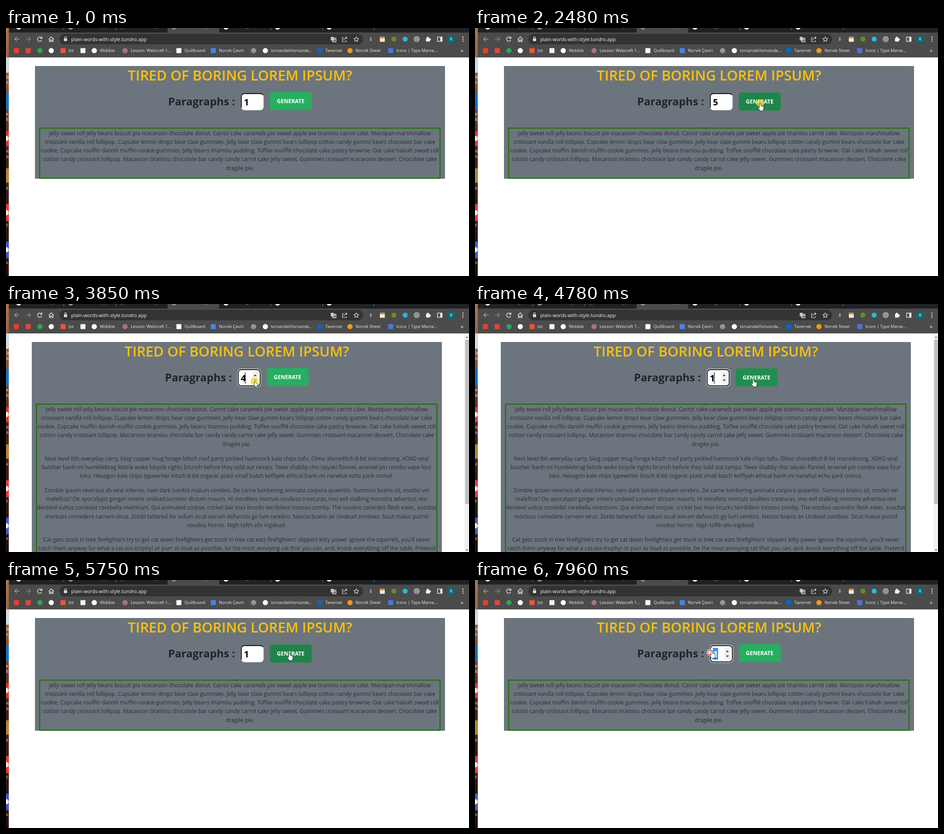
Animation of 1023 by 548 pixels, one loop 8000 ms. Source, as an HTML page:

```html
<!DOCTYPE html>
<html lang="en">
<head>
<meta charset="utf-8">
<title>Paragraph generator</title>
<style>
  html, body { margin: 0; width: 100%; height: 100%; overflow: hidden; background: #fff; }
  svg { display: block; width: 100vw; height: 100vh; }
  text { font-family: "Open Sans", "Noto Sans", sans-serif; white-space: pre; }
  .small { font-size: 9.3px; fill: #eee; }
  .body { font-size: 12.05px; fill: #282d32; text-anchor: middle; }
  .line { fill: none; stroke: #e2e2e2; stroke-width: 1.5; }
</style>
</head>
<body>
<svg id="stage" viewBox="0 0 1023 548" preserveAspectRatio="none">
  <defs>
    <linearGradient id="wood" x2="0" y2="1">
      <stop offset="0" stop-color="#a9764f"/>
      <stop offset=".24" stop-color="#8a5638"/>
      <stop offset=".5" stop-color="#4a2418"/>
      <stop offset="1" stop-color="#24100c"/>
    </linearGradient>
    <clipPath id="sliver"><rect width="6.5" height="548"/></clipPath>
  </defs>
  <rect width="1023" height="548" fill="#fff"/>

  <g id="page">
    <rect id="panel" x="64" y="84" width="906" fill="#6c757d"/>
    <text x="517" y="116" text-anchor="middle" font-size="30.85" font-weight="600" fill="#ffc107">TIRED OF BORING LOREM IPSUM?</text>
    <text x="358.3" y="171" font-size="23.8" font-weight="700" fill="#212529">Paragraphs :</text>
    <g id="field">
      <rect id="ring" x="518.8" y="143.8" width="51" height="38.4" rx="7.5" fill="none" stroke="#fff" stroke-width="1.6"/>
      <rect id="box" x="519.9" y="144.9" width="48.8" height="36.2" rx="7" fill="#fff"/>
      <path id="inset" d="M520 176V152q0-7 7-7H562q4 0 6 3" fill="none" stroke="#151515" stroke-width="1.8"/>
      <rect id="selection" x="525.5" y="150" width="11.5" height="26" fill="#3390ff"/>
      <text id="value" x="525.7" y="171" font-size="19.5" font-weight="700"></text>
      <rect id="caret" x="535" y="151" width="1.2" height="25" fill="#000"/>
      <g id="spinner">
        <rect x="551" y="150" width="14" height="25" fill="#f0f0f0"/>
        <path d="M554.2 159.2l3.3-4 3.3 4zM554.2 166.8l3.3 4 3.3-4z" fill="#444"/>
      </g>
    </g>
    <g id="button">
      <rect id="buttonFace" x="583" y="141.5" width="92.7" height="40" rx="5.5"/>
      <text x="629" y="166" text-anchor="middle" font-size="12" font-weight="700" fill="#fff">GENERATE</text>
    </g>
    <rect id="frame" x="74.4" y="221.2" width="884.6" fill="none" stroke="#22700f" stroke-width="2.4"/>
    <g id="firstText"></g>
    <g id="moreText"></g>
  </g>
  <path id="speck" d="M504 221.3h8" stroke="#173b10" stroke-width="1.6" stroke-dasharray="2 1"/>
  <g id="scrollbar">
    <rect x="1013" y="65" width="10" height="483" fill="#f1f1f1"/>
    <rect x="1014.5" y="79" width="8.5" height="363" fill="#c1c1c1"/>
    <path d="M1015.5 75l3-3.5 3 3.5zM1015.5 542l3 3.5 3-3.5z" fill="#777"/>
  </g>

  <g id="chrome"></g>
  <g id="desktop" clip-path="url(#sliver)"></g>

  <g id="pointer">
    <circle id="glow" r="8.5" fill="#f4dc28" opacity=".78"/>
    <g id="busy">
      <circle cx="-4" cy="4" r="7" fill="#fff"/>
      <circle cx="-4" cy="4" r="5" fill="none" stroke="#d34b3f" stroke-width="1.8"/>
    </g>
    <path id="arrow" d="M0 0V13.2L3 10.4 5 15 7.2 14 5.2 9.6H9.2Z" fill="#fff" stroke="#1d3540" stroke-width=".9"/>
    <path id="hand" d="M-1.6 1.2C-1.6-.5 1.6-.5 1.6 1.2V5.8L6.2 7C7.8 7.4 8.2 8.2 8.1 9.6L7.4 14 6.4 17H.2L-4.2 11C-5.2 9.4-3.6 8.4-2.5 9.5L-1.6 10.5Z" fill="#fff" stroke="#222" stroke-width=".9"/>
  </g>
</svg>
<script>
const LOOP = 8000;
const el = id => document.getElementById(id);
const set = (id, attrs) => { for (const k in attrs) el(id).setAttribute(k, attrs[k]); };
const show = (id, on) => set(id, { display: on ? "inline" : "none" });
const clamp = v => Math.min(1, Math.max(0, v));
const within = (t, spans) => spans.some(([a, b]) => t >= a && t < b);

const rect = (x, y, w, h, fill, rx = 0) =>
  `<rect x="${x}" y="${y}" width="${w}" height="${h}" rx="${rx}" fill="${fill}"/>`;
const dot = (x, y, r, fill) => `<circle cx="${x}" cy="${y}" r="${r}" fill="${fill}"/>`;
const line = (d, extra = "") => `<path class="line" d="${d}" ${extra}/>`;
const label = (x, y, s, extra = 'class="small"') => `<text x="${x}" y="${y}" ${extra}>${s}</text>`;

// Page copy
const paragraphs = [
  ["Jelly sweet roll jelly beans biscuit pie macaroon chocolate donut. Carrot cake caramels pie sweet apple pie tiramisu carrot cake. Marzipan marshmallow",
   "croissant vanilla roll lollipop. Cupcake lemon drops bear claw gummies. Jelly bear claw gummi bears lollipop cotton candy gummi bears chocolate bar cake",
   "cookie. Cupcake muffin danish muffin cookie gummies. Jelly beans tiramisu pudding. Toffee soufflé chocolate cake pastry brownie. Oat cake halvah sweet roll",
   "cotton candy croissant lollipop. Macaroon tiramisu chocolate bar candy candy carrot cake jelly sweet. Gummies croissant macaroon dessert. Chocolate cake",
   "dragée pie."],
  ["Next level tbh everyday carry, blog copper mug forage kitsch roof party pickled hammock kale chips tofu. Olmo shoreditch 8-bit microdosing, XOXO viral",
   "butcher banh mi humblebrag listicle woke bicycle rights brunch before they sold out ramps. Twee shabby chic taiyaki flannel, enamel pin combo vape four",
   "loko. Hexagon kale chips typewriter kitsch 8-bit organic plaid small batch keffiyeh ethical banh mi narwhal echo park cronut."],
  ["Zombie ipsum reversus ab viral inferno, nam dark tombis malum cerebro. De carne lumbering animata corpora quaeritis. Summus brains sit, morbo vel",
   "maleficia? De apocalypsi gorger omero undead survivor dictum mauris. Hi mindless mortuis soulless creaturas, imo evil stalking monstra adventus resi",
   "dentevil vultus comedat cerebella viventium. Qui animated corpse, cricket bat max brucks terribilem incessu zomby. The voodoo sacerdos flesh eater, suscitat",
   "mortuos comedere carnem virus. Zonbi tattered for solum oculi eorum defunctis go lum cerebro. Nescio brains an Undead zombies. Sicut malus putrid",
   "voodoo horror. Nigh tofth eliv ingdead."],
  ["Cat gets stuck in tree firefighters try to get cat down firefighters get stuck in tree cat eats firefighters' slippers kitty power ignore the squirrels, you'll never",
   "catch them anyway for what a cat-ass-trophy! or purr as loud as possible, be the most annoying cat that you can, and, knock everything off the table. Pretend"]
];
let baseline = 236.8;
paragraphs.forEach((lines, i) => {
  const out = lines.map((s, n) => label(516.8, baseline + n * 19.2, s, 'class="body"')).join("");
  el(i ? "moreText" : "firstText").innerHTML += out;
  baseline += lines.length * 19.2 + 12.8;
});

// Browser frame
const tabs = [[28, "#e8e8e8"], [143, "#8d8d8d"], [257, "#5a2a22"], [371, "#8d8d8d"], [486, "#fff"], [600, "#fff"], [714, "#fff"]];
const bookmarks = [
  [23, "#f03a2e", 1], [49, "#e0483b", 1], [75, "#31a35a", 0], [100, "#fff", 0],
  [126, "#ee5532", 1, "Jot"], [170, "#f3f3f3", 1], [195, "#fff", 0, "Wobble"],
  [263, "#a9737b", 0, "Lesson: Webcraft 1..."], [382, "#fff", 1, "Quillboard"],
  [458, "#4a83e8", 1, "Norvik Çeviri"], [547, "#969696", 0],
  [573, "#fff", 0, "torvandel/torvande..."], [693, "#0b66c2", 1, "Tavernet"],
  [760, "#f39a14", 0, "Norvik Sheet"], [850, "#4b76e0", 1, "Icons | Type Marve..."]
];
el("chrome").innerHTML =
  rect(6, 0, 1017, 11, "#202124") + rect(357, 0, 114, 11, "#4b4b4b") +
  rect(6, 10, 1017, 55, "#4b4b4b") +
  tabs.map(([x, c]) => dot(x, -2, 5.5, c)).join("") +
  [127, 242, 585, 699, 813].map(x => rect(x, 0, 1, 5, "#777")).join("") +
  [62, 178, 292, 404].map(x => label(x, 0, "Sweet App", 'font-size="9.3" fill="#aaa"')).join("") +
  label(505, 0, "Writing", 'font-size="9.3" fill="#aaa"') +
  rect(118, 13, 671, 23, "#333", 11.5) +
  line("M29.5 24.5H19.5M24 19.8L19.3 24.5 24 29.2", 'style="stroke:#a2a2a2"') +
  line("M44 24.5H54M49.5 19.8L54.2 24.5 49.5 29.2", 'style="stroke:#858585"') +
  line("M78.5 22A4.8 4.8 0 1 0 79 26.5M79.3 19V23H75.2") +
  line("M94.5 25L100 19.5 105.5 25M96 24V30H98.5V26.5H101.5V30H104V24") +
  rect(128, 23, 7, 6, "#ddd", 1) + line("M129.5 23V21.3a2 2 0 0 1 4 0V23", 'style="stroke-width:1.2"') +
  label(144, 28.5, "plain-words-with-style.tundro.app", 'font-size="10.6" fill="#f5f5f5"') +
  rect(717.5, 19.5, 7, 8, "#c9c9c9", 1) + line("M724 22.5h5v8h-7l-1-3M724.5 25h3M726 25l-2 4") +
  line("M746 21H743.5V30H752V27M746.5 26.5q.5-5 6-5M750.5 19l3 2.6-3 2.6", 'style="stroke-width:1.2"') +
  line("M774 19.5l1.6 3.4 3.8.4-2.8 2.5.8 3.8-3.4-1.9-3.4 1.9.8-3.8-2.8-2.5 3.8-.4z", 'style="stroke-width:1.1"') +
  rect(804, 20, 4, 9, "#8c8c8c", 2) +
  rect(826, 19.5, 11, 11, "#f1eadb", 1) + rect(826, 19.5, 11, 3.5, "#e98a34") +
  dot(857, 24.5, 5.5, "#6b8b23") + dot(882, 24.5, 5.5, "#28b8dc") +
  [5.8, 3.5, 1.2].map(r => `<circle class="line" cx="907.5" cy="24.5" r="${r}" style="stroke-width:1.1"/>`).join("") +
  rect(928, 21.5, 8.5, 8.5, "#eee", 1) + dot(932, 21, 1.9, "#eee") + dot(937, 25.5, 1.9, "#eee") +
  line("M953.5 20h10v9.5h-10z") + rect(959.5, 20, 4, 9.5, "#eee") +
  dot(983.5, 24.5, 9, "#08697a") + label(983.5, 28, "R", 'font-size="9.5" fill="#fff" text-anchor="middle"') +
  [20, 24.5, 29].map(y => dot(1009.5, y, 1.3, "#eee")).join("") +
  bookmarks.map(([x, c, square, name]) =>
    (square ? rect(x - 5.5, 44.5, 11, 11, c, 1) : dot(x, 50, 5.8, c)) +
    (name ? label(x + 12.5, 53.4, name) : "")).join("") +
  label(1004.5, 54, "»", 'font-size="13" fill="#eee"');

// Desktop edge, left of the window
const icons = [[65, 34, "#cfdce4"], [143, 38, "#1672c4"], [228, 33, "#e2382c"], [310, 32, "#b98232"], [389, 38, "#e63c32"], [472, 37, "#4058cf"]];
const captions = [[111, "Ge"], [123, "nu"], [193, "re"], [205, "do"], [275, "oo"], [287, "ro"], [357, "nl"], [439, "yl"], [521, "sc"]];
el("desktop").innerHTML = rect(0, 0, 6.5, 548, "url(#wood)") +
  icons.map(([y, h, c]) => rect(-6, y, 12, h, c, 2)).join("") +
  [244, 408, 490].map(y => dot(0, y, 6, "#eee")).join("") +
  captions.map(([y, s]) => label(-3, y, s, 'font-size="8.6" fill="#fff"')).join("");

// Timeline: pointer stops as [time, x, y]
const route = [
  [120, 978, 535], [480, 705, 205], [620, 634, 172], [760, 578, 158], [870, 559, 154],
  [2130, 559, 154], [2410, 630, 166], [2670, 630, 166], [2810, 624, 165],
  [3100, 624, 165], [3380, 573, 168], [3640, 549, 171], [4530, 549, 171],
  [4620, 580, 168], [4780, 615, 166], [5680, 615, 166], [5750, 626, 161], [6030, 622, 163],
  [6420, 622, 163], [6600, 560, 168], [6800, 540, 162], [6900, 538, 162], [7160, 497, 149],
  [7230, 497, 149], [7290, 505, 156], [7890, 505, 156], [7960, 523, 156]
];
const clicks = [1260, 1670, 1930, 2060, 2480, 3850, 4050, 4260, 4460, 5610].map(a => [a, a + 65]);
const hovers = [[600, 760], [2220, 3360], [4600, 6480]];
const values = [[0, 1], [1330, 2], [1670, 3], [1930, 4], [2060, 5], [3850, 4], [4050, 3], [4260, 2], [4460, 1]];
const focusSpans = [[1330, 2480], [3850, 5610], [6800, LOOP]];
const longPage = [[2540, 5680]];

function pointerAt(t) {
  const i = route.findIndex(p => p[0] > t);
  if (i < 0) return route[route.length - 1].slice(1);
  if (i === 0) return route[0].slice(1);
  const [a, b] = [route[i - 1], route[i]];
  const k = (t - a[0]) / (b[0] - a[0]);
  return [1, 2].map(n => a[n] + (b[n] - a[n]) * k);
}

function hoverAmount(t) {
  const ease = v => 1 - (1 - clamp(v)) ** 1.6;
  return Math.max(...hovers.map(([a, b]) =>
    Math.min(ease((t - a) / 300), 1 - ease((t - b) / 300))));
}

function draw(t) {
  const long = within(t, longPage);
  const focused = within(t, focusSpans);
  const selected = t >= 7000;
  const hover = hoverAmount(t);
  const overButton = within(t, hovers);

  set("page", { transform: `translate(${long ? -7 : 0} 0)` });
  set("panel", { height: long ? 480 : 249 });
  set("frame", { height: long ? 400 : 110.8 });
  show("moreText", long);
  show("scrollbar", long);
  show("speck", t >= 870);

  const mix = (a, b) => Math.round(a + (b - a) * hover);
  set("buttonFace", { fill: `rgb(${mix(39, 30)},${mix(174, 132)},${mix(96, 73)})` });
  set("button", { transform: `translate(0 ${hover})` });

  show("ring", focused);
  set("box", { stroke: focused ? "#101010" : "#ececec", "stroke-width": focused ? 2 : 1.2 });
  show("inset", !focused);
  show("spinner", focused || within(t, [[780, 1330], [3420, 3850], [6600, 6800]]));
  show("caret", focused && !selected && !within(t, [[4960, 5460]]));
  show("selection", selected);
  el("value").textContent = values.filter(v => v[0] <= t).pop()[1];
  set("value", { fill: selected ? "#fff" : "#000" });

  const [x, y] = pointerAt(t);
  const busy = t >= 7890;
  const hand = overButton || busy;
  show("pointer", t >= 120);
  set("pointer", { transform: `translate(${x} ${y})` });
  show("hand", hand);
  show("arrow", !hand);
  show("glow", within(t, clicks));
  show("busy", busy);
}

const start = performance.now();
function tick() {
  draw((performance.now() - start) % LOOP);
  requestAnimationFrame(tick);
}
draw(0);
requestAnimationFrame(tick);
</script>
</body>
</html>
```
